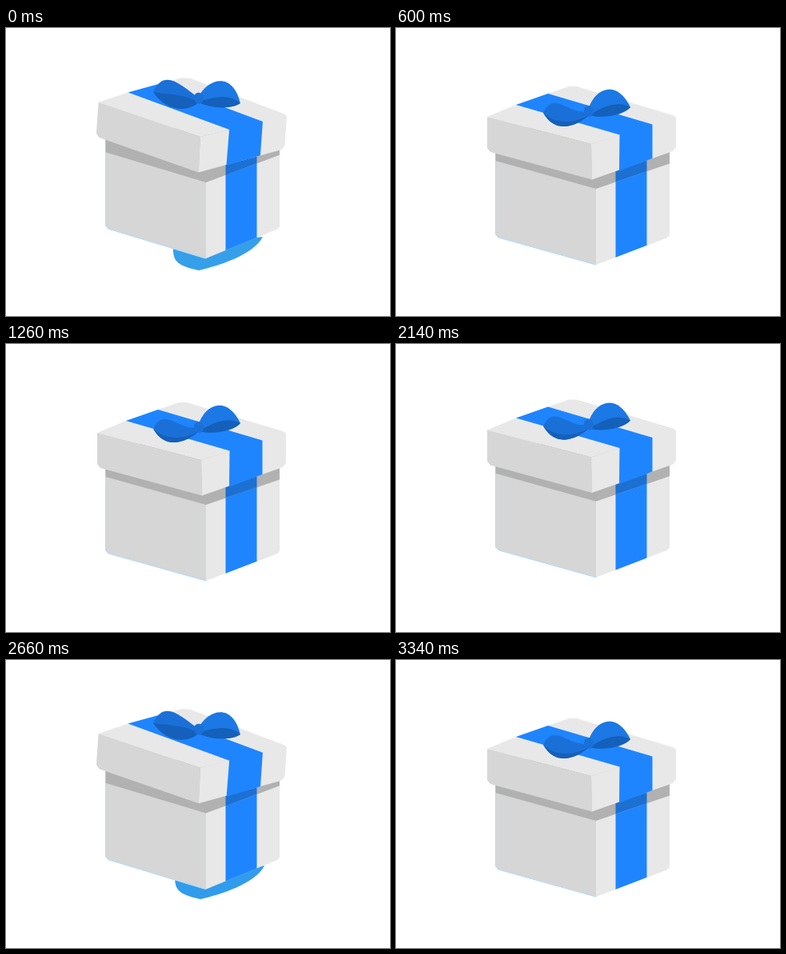
Write an HTML page with a canvas that moves like this. It is 480 px wide and 360 px high and loops after 3360 ms.

```html
<!DOCTYPE html>
<html lang="en">
<head>
<meta charset="utf-8">
<title>Bouncing gift box</title>
<style>
  html, body { margin: 0; width: 100%; height: 100%; overflow: hidden; background: #fff; }
  canvas { display: block; width: 480px; height: 360px; }
</style>
</head>
<body>
<canvas id="stage" width="480" height="360"></canvas>
<script>
const ctx = document.getElementById('stage').getContext('2d');
const LOOP = 3360, STEP = 20, REST = 1000;

const BLUE = '#1e85ff', BLUE_SHADE = '#1c70d2';
const BOW = '#1b70d8', BOW_LIGHT = '#1b78e4', BOW_DARK = '#1560ba';
const LIGHT = '#e8e8e8', MID = '#d5d6d5', SHADE = '#b1b1b1', EDGE = '#b4dcff';

const mix = (a, b, k) => a + (b - a) * k;

// Half a sine wave between two moments, zero outside
const arc = (p, from, to) =>
  p <= from || p >= to ? 0 : Math.sin(Math.PI * (p - from) / (to - from));

// The loop opens halfway through a bounce, then plays a quick and a full one
function phaseAt(t) {
  if (t < 400) return 540 + t * 1.37;
  if (t >= 600 && t < 1280) return -60 + (t - 600) * 1.7;
  if (t >= 2140) return t - 2140;
  return REST;
}

function poseAt(p) {
  const hop = 19.5 * arc(p, -50, 660) + 6 * arc(p, 540, 900);
  const tilt = arc(p, 230, 920) ** 2;
  const lift = arc(p, 60, 960);
  const lid = -0.8 * hop - 2 * tilt;
  return {
    hop, lift, lid,
    side: -hop - tilt,
    front: -hop + 2 * tilt,
    angle: 0.073 * tilt,
    bow: lid - 6.5 * lift,
    puff: 1.1 * arc(p, 440, 745)
  };
}

function poly(color, ...pts) {
  ctx.beginPath();
  for (let i = 0; i < pts.length; i += 2) ctx.lineTo(pts[i], pts[i + 1]);
  ctx.closePath();
  ctx.fillStyle = color;
  ctx.fill();
}

function curve(color, x, y, ...beziers) {
  ctx.beginPath();
  ctx.moveTo(x, y);
  for (const b of beziers) ctx.bezierCurveTo(...b);
  ctx.closePath();
  ctx.fillStyle = color;
  ctx.fill();
}

function drawPuff({ puff, hop }) {
  if (puff <= 0) return;
  const k = Math.min(1, puff);
  ctx.save();
  ctx.translate((1 - puff) * 16, (puff - 1) * 18 + 9.9 - hop);
  curve(`rgb(${mix(30, 54, k)},${mix(134, 161, k)},${mix(245, 232, k)})`, 208, 276,
    [208, 292, 212, 298, 240, 304], [265, 298, 308, 285, 320, 262]);
  ctx.restore();
}

function drawBase({ side, front }) {
  const L = 124.5, C = 250, R = 342, top = 125;
  const onRight = (y0, y1) => x => mix(y0 + front, y1 + side, (x - C) / (R - C));
  const bottom = onRight(296, 261), band = onRight(201, 169.5);
  const strip = (color, x0, x1, edge) => poly(color, x0, top, x1, top, x1, edge(x1), x0, edge(x0));

  poly(MID, L, top, C, top, C, bottom(C), 246, 295 + front, 128, 262 + side, L, 258 + side);
  ctx.strokeStyle = EDGE;
  ctx.stroke();
  poly(LIGHT, C, top, R, top, R, 259 + side, 339, bottom(339), C, bottom(C));
  strip(BLUE, 274.5, 313.5, bottom);
  poly(SHADE, L, top, C, top, C, band(C), L, 166 + side);
  strip(SHADE, C, R, band);
  strip(BLUE_SHADE, 274.5, 313.5, band);
}

function drawLid({ lid, angle }) {
  ctx.save();
  ctx.translate(232, 130 + lid);
  ctx.rotate(angle);
  ctx.translate(-232, -130);
  poly(LIGHT, 114, 111, 150, 96, 190, 82, 216, 73, 226, 73, 346, 109, 350, 112, 244, 145);
  poly(MID, 114, 111, 244, 145, 245, 189.5, 118, 155, 114, 150);
  poly(LIGHT, 244, 145, 350, 111, 350, 149, 346, 154, 245, 189.5);
  poly(BLUE, 150, 96, 190, 82, 320.5, 120.5, 320.5, 163, 279, 178.5, 279.5, 133.5);
  ctx.restore();
}

// A loop of ribbon from the knot to its tip, with a darker fold below
function drawLobe(color, top1, top2, tip, low1, low2, fold1, fold2) {
  const under = [...low1, ...low2, 0, 5];
  curve(color, -1, -1, [...top1, ...top2, ...tip], under);
  curve(BOW_DARK, ...tip, under, [...fold2, ...fold1, ...tip]);
}

function drawBow({ bow, lift }) {
  const up = (x, rest, raised) => [x, mix(rest, raised, lift)];
  ctx.save();
  ctx.translate(241, 104 + bow);
  drawLobe(BOW, up(-22, 8, -16), up(-43, -28, -38), up(-57, 2, -8),
    up(-41, 30, 17), [-14, 18], up(-42, 16, -4), up(-20, 16, -7));
  ctx.save();
  ctx.rotate(lift * 0.22);
  drawLobe(BOW_LIGHT, [6, -27], [34, -42], [52, -5], [44, 4], [20, 10], [40, -12], [24, -10]);
  ctx.restore();
  ctx.beginPath();
  ctx.ellipse(0, 0, 6, 7, -0.3, 0, Math.PI * 2);
  ctx.fillStyle = BOW;
  ctx.fill();
  ctx.restore();
}

function draw(t) {
  const pose = poseAt(phaseAt(t));
  ctx.fillStyle = '#fff';
  ctx.fillRect(0, 0, 480, 360);
  drawPuff(pose);
  drawBase(pose);
  drawLid(pose);
  drawBow(pose);
}

const start = performance.now();
function tick() {
  const t = (performance.now() - start) % LOOP;
  draw(Math.floor(t / STEP) * STEP);
  requestAnimationFrame(tick);
}
tick();
</script>
</body>
</html>
```
